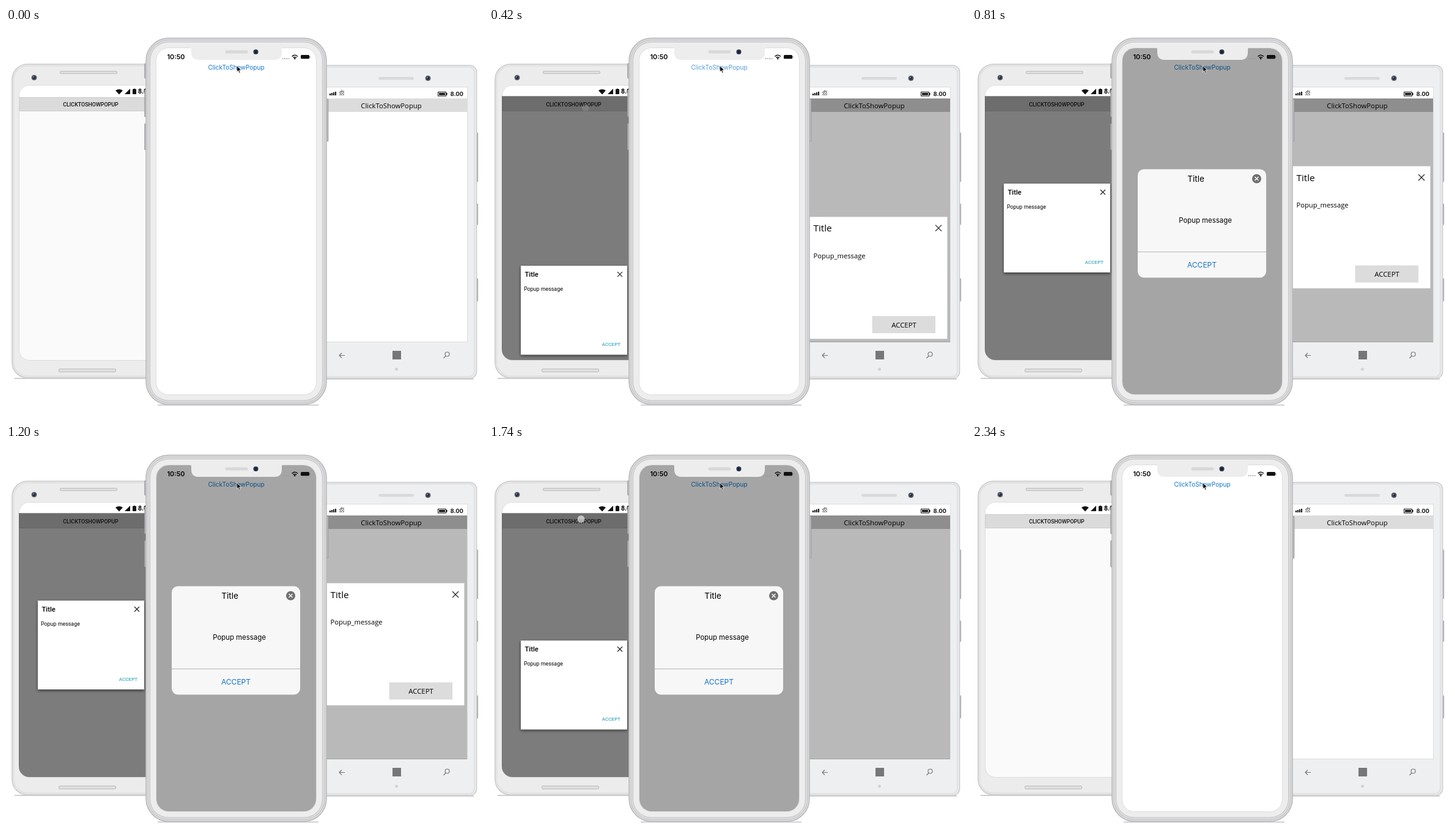
These frames come from a looping animation (780 by 635 pixels, 2880 ms). An HTML page:

```html
<!DOCTYPE html>
<html lang="en">
<head>
<meta charset="utf-8">
<title>Popup on three phones</title>
<style>
  html, body { margin: 0; width: 100%; height: 100%; overflow: hidden; background: #fff; }
  svg { display: block; }
  .android { font-family: Roboto, sans-serif; }
  .ios { font-family: Inter, sans-serif; }
  .windows { font-family: "Open Sans", sans-serif; }
  .mid { text-anchor: middle; }
  .line { fill: none; stroke: #222; stroke-width: 1.2; }
</style>
</head>
<body>
<svg width="780" height="635" viewBox="0 0 780 635">
  <defs>
    <clipPath id="androidScreen"><path d="M21 111H235V542H38a17 17 0 0 1-17-17z"/></clipPath>
    <clipPath id="iosScreen"><rect x="246" y="33" width="261" height="565" rx="20"/></clipPath>
    <clipPath id="windowsScreen"><rect x="515" y="115" width="239" height="398"/></clipPath>
    <filter id="shadow" x="-10%" y="-10%" width="120%" height="125%">
      <feDropShadow dx="0" dy="2" stdDeviation="2.5" flood-opacity=".55"/>
    </filter>
    <g id="camera">
      <circle r="5" fill="#c4c6ca"/><circle r="4" fill="#454b59"/>
      <circle r="2" fill="#20263a"/><circle cx="-1" cy="-1" r="1" fill="#8b93a8"/>
    </g>
  </defs>

  <g class="android">
    <path d="M14 572H240" stroke="#cfcfcf" stroke-width="2"/>
    <rect x="10" y="59" width="260" height="512" rx="25" fill="#ececec" stroke="#cbcbcb" stroke-width="1.6"/>
    <rect x="12.5" y="61.500" width="255" height="507" rx="23" fill="none" stroke="#e0e0e0" stroke-width="2"/>
    <g fill="#dedede" stroke="#bdbdbd">
      <rect x="88.500" y="70.500" width="93" height="4" rx="1.500"/>
      <rect x="86.500" y="556.500" width="93" height="5" rx="1.500"/>
    </g>
    <use href="#camera" x="46" y="81"/>
    <rect x="21.500" y="93.500" width="240" height="449" rx="17" fill="#fafafa" stroke="#dcdcdc"/>
    <path d="M22 112V110a16 16 0 0 1 16-16H240v18z" fill="#fff"/>
    <path d="M179 102q6-4 12 0l-6 6.500zM194 108h9v-9zM207 100h1.500v-1h3v1h1.500v8h-6z" fill="#111"/>
    <text x="216" y="107" font-size="10.500" font-weight="700">8.00</text>
    <g clip-path="url(#androidScreen)">
      <rect x="22" y="113.500" width="220" height="22" fill="#dbdbdb" stroke="#cdcdcd"/>
      <rect id="androidDim" x="21" y="111" width="220" height="432"/>
      <text class="mid" x="138.500" y="128" font-size="8.900" font-weight="500" fill="#111">CLICKTOSHOWPOPUP</text>
      <circle id="touch" r="6" fill="#eef0f4"/>
      <g id="androidPopup">
        <rect x="52" y="254" width="174" height="145" fill="#fff" filter="url(#shadow)"/>
        <text x="58.500" y="272" font-size="11.200" font-weight="500">Title</text>
        <path class="line" d="M210 264l8 8m0-8l-8 8"/>
        <text x="57" y="295" font-size="8.900">Popup message</text>
        <text class="mid" x="200" y="385" font-size="8.100" fill="#1297b4">ACCEPT</text>
      </g>
    </g>
  </g>

  <g class="windows">
    <path d="M510 573H765" stroke="#cfcfcf" stroke-width="2"/>
    <g fill="#b4b4b6" stroke="#8f8f92" stroke-width=".6">
      <rect x="768" y="171" width="3.600" height="80" rx="1"/>
      <rect x="768" y="287" width="3.600" height="34" rx="1"/>
      <rect x="768" y="409" width="3.600" height="37" rx="1"/>
    </g>
    <rect x="480" y="61" width="289.500" height="511" rx="11" fill="#eeeff0" stroke="#cdcdcf" stroke-width="1.600"/>
    <rect x="480" y="63.500" width="286" height="506" rx="9" fill="none" stroke="#e1e2e4" stroke-width="2.500"/>
    <rect x="609" y="80" width="58" height="4.500" rx="2" fill="#d8d9db"/>
    <use href="#camera" x="690" y="82"/>
    <rect x="500" y="96.500" width="254.500" height="416" fill="#fff" stroke="#dcdddf"/>
    <path d="M529 110v-3h2v3zM532 110v-4h2v4zM535 110v-5h2v5zM538 110v-6h2v6z" fill="#111"/>
    <g fill="none" stroke="#333">
      <path d="M546 110a7 7 0 0 1 7-7M548.500 110a4.500 4.500 0 0 1 4.500-4.500M551 110a2 2 0 0 1 2-2M545 106a8 8 0 0 1 5-4"/>
      <rect x="706.500" y="104.500" width="13" height="6.500" stroke="#111"/>
    </g>
    <path d="M708 106h10v3.500h-10zM720 106h1.500v3.500h-1.500z" fill="#111"/>
    <text x="726.500" y="111" font-family="Inter, sans-serif" font-size="9.600" font-weight="600">8.00</text>
    <g clip-path="url(#windowsScreen)">
      <rect id="windowsBar" x="500" y="115" width="254" height="22"/>
      <rect id="windowsDim" x="500" y="115" width="254" height="398"/>
      <text class="mid" x="630" y="130.500" font-size="11.300">ClickToShowPopup</text>
      <g id="windowsPopup">
        <rect x="500" y="225.500" width="249.500" height="199.500" fill="#fff" stroke="#cfcfcf" stroke-width=".6"/>
        <text x="530.500" y="249.500" font-size="15.300">Title</text>
        <path class="line" d="M730 239l10 10m0-10l-10 10"/>
        <text x="530.500" y="293" font-size="11.200">Popup_message</text>
        <rect x="626.500" y="387.500" width="103.500" height="28" fill="#dcdcdc"/>
        <text class="mid" x="678.500" y="406" font-size="11.400">ACCEPT</text>
      </g>
    </g>
    <g fill="none" stroke="#777" stroke-width="1.200">
      <path d="M554 534.500h-9m4-4l-4 4 4 4"/>
      <circle cx="721.500" cy="532.500" r="3.500"/><path d="M719 535.500l-3.500 3.500"/>
    </g>
    <rect x="632" y="527" width="14" height="14" fill="#777"/>
    <circle cx="638.500" cy="557" r="2.500" fill="#d2d3d5"/>
  </g>

  <g class="ios">
    <path d="M248 615.500H511" stroke="#d0d0d0" stroke-width="2"/>
    <g fill="#b5b5b7" stroke="#929294" stroke-width=".6">
      <rect x="226.500" y="58" width="4" height="24" rx="1"/>
      <rect x="226.500" y="101" width="4" height="44" rx="1"/>
      <rect x="226.500" y="156" width="4" height="43" rx="1"/>
      <rect x="523" y="116" width="4" height="69" rx="1"/>
    </g>
    <rect x="229" y="16.500" width="295" height="598" rx="37" fill="#dcdcde" stroke="#b8b8ba" stroke-width="1.500"/>
    <rect x="232" y="19.500" width="289" height="592" rx="34" fill="none" stroke="#cacacc" stroke-width="1.500"/>
    <rect x="235.500" y="23" width="282" height="585" rx="30" fill="#ededee" stroke="#c3c3c6"/>
    <rect x="245.500" y="32.500" width="262" height="566" rx="20" fill="#fff" stroke="#dededf"/>
    <g clip-path="url(#iosScreen)">
      <text id="link" class="mid" x="376.500" y="68" font-size="10.100" fill="#1578c9">ClickToShowPopup</text>
      <rect id="iosDim" x="246" y="33" width="261" height="565"/>
      <g id="iosPopup">
        <rect x="271" y="230.500" width="210" height="177" rx="10" fill="#f7f7f7"/>
        <text class="mid" x="366" y="251" font-size="13.600">Title</text>
        <circle cx="465.500" cy="246" r="7.500" fill="#6f6f71"/>
        <path d="M462.500 243l6 6m0-6l-6 6" stroke="#fff" stroke-width="1.400"/>
        <text class="mid" x="381.500" y="318" font-size="11.400">Popup message</text>
        <path d="M271 365.500h210" stroke="#b3b3b5"/>
        <text class="mid" x="376" y="390.500" font-size="12" fill="#1873c4">ACCEPT</text>
      </g>
    </g>
    <text x="263.500" y="51" font-size="10.800" font-weight="600">10:50</text>
    <path d="M302 32q1 1 1 5v3q0 12 12 12H439q12 0 12-12v-3q0-4 1-5z" fill="#ededee"/>
    <rect x="358.500" y="36.500" width="37" height="5" rx="2.500" fill="#d8d8da"/>
    <circle cx="408.500" cy="39" r="4" fill="#27344b"/><circle cx="408.500" cy="39" r="1.500" fill="#111a2c"/>
    <path d="M451.500 50h12" stroke="#999" stroke-width="1.600" stroke-dasharray="2 1.400"/>
    <g fill="none" stroke="#111" stroke-width="1.500">
      <path d="M467.500 46.500q5-4.500 9.500 0M469.500 48.700q3-2.500 5.500 0"/>
    </g>
    <circle cx="472.200" cy="50" r="1.200"/>
    <rect x="482" y="44" width="14" height="6.200" rx="1.500" fill="#111"/>
    <path d="M497 46v2.500" stroke="#666"/>
    <path d="M377.500 61.500v10.300l2.300-2.200 1.700 4 1.700-.8-1.700-3.800h3.200z" fill="#111" stroke="#fff" stroke-width=".7"/>
  </g>
</svg>
<script>
const LOOP = 2880, STEP = 30;
const el = id => document.getElementById(id);
const ramp = (t, from, to) => Math.min(1, Math.max(0, (t - from) / (to - from)));
const ease = (t, from, to) => (1 - Math.cos(Math.PI * ramp(t, from, to))) / 2;
// Rises from in0 to in1, falls from out0 to out1.
const pulse = (curve, t, in0, in1, out0, out1) => curve(t, in0, in1) - curve(t, out0, out1);

const fade = (id, opacity) => el(id).setAttribute("opacity", opacity);
function slide(id, distance, shown) {
  el(id).setAttribute("transform", `translate(0 ${distance * (1 - shown)})`);
  el(id).setAttribute("visibility", shown > 0 ? "visible" : "hidden");
}

function render(t) {
  fade("androidDim", 0.5 * pulse(ramp, t, 60, 210, 1950, 2040));
  slide("androidPopup", 288, pulse(ease, t, 300, 530, 1680, 1870));

  const windowsShown = t < 1800 ? ramp(t, 90, 240) : 0;
  fade("windowsDim", 0.275 * windowsShown);
  el("windowsBar").setAttribute("fill", windowsShown ? "#c4c4c4" : "#dcdcdc");
  slide("windowsPopup", 288, pulse(ease, t, 260, 510, 1650, 1740));

  fade("iosDim", 0.353 * pulse(ramp, t, 420, 540, 1950, 2040));
  slide("iosPopup", 368, pulse(ease, t, 440, 678, 1770, 1920));
  fade("link", 1 - 0.55 * pulse(ramp, t, 390, 450, 600, 810));

  const second = t > 1000;
  el("touch").setAttribute("transform", second ? "translate(150.5 121)" : "translate(158 130)");
  fade("touch", second ? 0.65 * pulse(ramp, t, 1560, 1680, 1770, 2040)
                       : 0.35 * pulse(ramp, t, 30, 90, 300, 480));
}

function tick() {
  const t = performance.now() % LOOP;
  render(t - t % STEP);
  requestAnimationFrame(tick);
}
tick();
</script>
</body>
</html>
```
